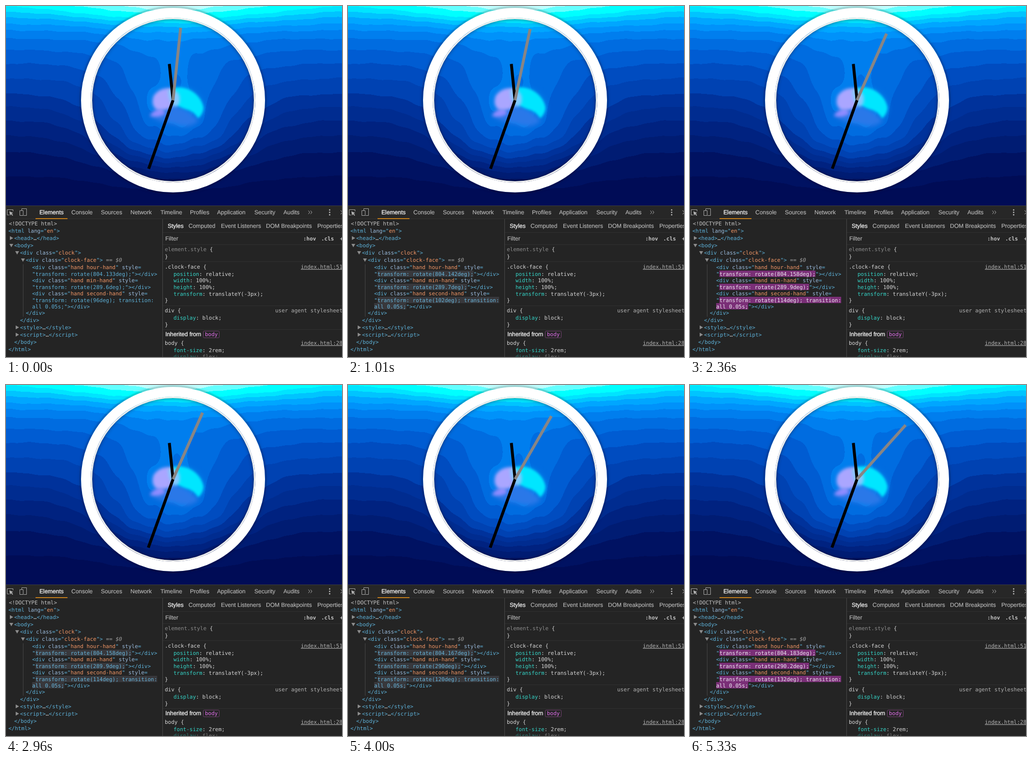
An HTML page with a canvas that plays this animation: 694x723 px, repeating every 5430 ms.

```html
<!DOCTYPE html>
<html lang="en">
<head>
<meta charset="utf-8">
<title>Clock and inspector</title>
<style>
html, body { margin: 0; width: 100%; height: 100%; overflow: hidden; background: #242424; }
canvas, svg, .clock { position: absolute; left: 0; top: 0; }
svg { overflow: hidden; }
.clock {
  left: 155px; top: 4px; width: 380px; height: 380px; box-sizing: border-box;
  border: 20px solid #fff; border-radius: 50%;
  box-shadow: 0 0 0 4px rgba(0,0,0,.1), inset 0 0 0 3px #efefef,
    inset 0 0 10px #000, 0 0 10px rgba(0,0,0,.2);
}
text { white-space: pre; text-rendering: geometricPrecision; }
.mono { font: 11px "DejaVu Sans Mono", monospace; }
.ui { font: 12px "Liberation Sans", sans-serif; }
</style>
</head>
<body>
<canvas id="sea" width="694" height="411"></canvas>
<div class="clock"></div>
<svg id="stage" width="694" height="723" viewBox="0 0 694 723"></svg>
<script>
const LOOP = 5430;
const CENTER = { x: 345, y: 194 };

// ---------- underwater backdrop ----------
// Each band: depth where it ends, colour.
const BANDS = [
  [-31, '#beffff'], [-19, '#64ffff'], [-3, '#00ffff'], [8, '#00e4ff'], [20, '#00c4ff'],
  [34, '#00a6ff'], [48, '#0092fa'], [66, '#007eee'], [90, '#006ce0'], [118, '#005cd2'],
  [148, '#004cc0'], [180, '#0042b2'], [207, '#00329b'], [235, '#002c90'],
  [265, '#002280'], [300, '#001c73'], [350, '#001262'], [Infinity, '#000c56']
];
const bell = v => Math.exp(-v * v);

// The lit water around the middle lifts lighter bands downwards.
function depth(x, y) {
  const dx = x - CENTER.x, dy = y - 260;
  const glow = bell(dx / 145) * bell(dy / (dy < 0 ? 130 : 90));
  const surface = 36 * bell(dx / 230) * bell(y / 42);
  const ripple = Math.sin(x / 13 + y / 29) + Math.sin(x / 31 - y / 17) + .6 * Math.sin(x / 6);
  return y - 180 * glow - surface + ripple * (.8 + 4 * glow);
}

function drawSea() {
  const c = document.getElementById('sea').getContext('2d');
  const bandAt = (x, y) => BANDS.findIndex(b => depth(x, y) < b[0]);
  for (let x = 0; x < 694; x++) {
    let start = 0, band = bandAt(x, 0);
    for (let y = 1; y <= 411; y++) {
      const next = y < 411 ? bandAt(x, y) : -1;
      if (next === band) continue;
      c.fillStyle = BANDS[band][1];
      c.fillRect(x, start, 1, y - start);
      start = y;
      band = next;
    }
  }
  const blob = (color, blur, path) => {
    c.filter = `blur(${blur}px)`;
    c.fillStyle = color;
    c.fill(new Path2D(path));
  };
  const dome = 'M345 169C375 162 404 183 408 210Q406 224 397 231Q388 216 370 212Q352 206 345 195Z';
  blob('#008cf0', 7, dome);
  blob('#2a78e8', 5, 'M298 226Q306 206 345 204Q380 214 398 236Q380 256 345 242Q315 240 298 226Z');
  blob('#00e6ff', 2.5, dome);
  blob('#8f8cff', 3, 'M297 226Q308 212 322 212L330 221Q315 232 297 226Z');
  blob('#aaa6ff', 3, 'M345 170Q318 166 305 185Q298 205 312 214Q332 216 345 207Z');
  blob('#86c8ff', 3, 'M334 173Q350 168 358 184Q362 203 350 208Q336 202 334 173Z');
  c.filter = 'none';
}

// ---------- drawing helpers ----------
const stage = document.getElementById('stage');
function add(tag, attrs, parent = stage) {
  const el = document.createElementNS('http://www.w3.org/2000/svg', tag);
  for (const key in attrs) el.setAttribute(key, attrs[key]);
  return parent.appendChild(el);
}
const rect = (x, y, width, height, fill) => add('rect', { x, y, width, height, fill });
const path = (d, stroke, fill = 'none') => add('path', { d, stroke, fill });

const TAG = '#5db0d7', ATTR = '#9bbbdc', VALUE = '#f29766', PALE = '#d6d6d6', DIM = '#8a8a8a', PROP = '#35d4c7';

// Parts alternate: colour, text. y is the middle of the line.
function mono(x, y, ...parts) {
  const text = add('text', { x, y: y + 4, class: 'mono' });
  const spans = [];
  for (let i = 0; i < parts.length; i += 2) {
    const span = add('tspan', { fill: parts[i] }, text);
    span.textContent = parts[i + 1];
    spans.push(span);
  }
  return spans;
}
function label(x, y, content, active) {
  const fill = active ? '#efefef' : '#b9b9b9';
  add('text', { x, y: y + 4, class: 'ui', fill, stroke: fill, 'stroke-width': active ? .35 : .15 })
    .textContent = content;
}
const attrParts = (name, value) => [ATTR, ` ${name}`, TAG, '="', VALUE, value, TAG, '"'];
function arrow(x, y, open) {
  path(open ? `M${x} ${y - 3}h8l-4 7z` : `M${x + 1} ${y - 4}v8l7 -4z`, 'none', '#8c8c8c');
}

// ---------- inspector ----------
function drawToolbar() {
  rect(0, 411, 694, 312, '#242424');
  rect(0, 411, 694, 28, '#272727');
  rect(0, 411, 694, 1, '#3c3c3c');
  rect(0, 438, 694, 1, '#333');
  rect(61, 437, 66, 2, '#c27d1c');
  path('M14.5 423v-3.5h-12v11h4', '#a8a8a8');
  path('M7 423l8 3.2l-3.4 1.3l3 3.2l-1.4 1.3l-3-3.2l-1.7 3z', 'none', '#b4b4b4');
  path('M32.5 421v-3.5h10v14h-6M28.5 421.5h7v10h-7z', '#a8a8a8');
  const tabs = { Elements: 69, Console: 135, Sources: 196, Network: 257, Timeline: 319,
    Profiles: 380, Application: 436, Security: 513, Audits: 573 };
  for (const name in tabs) label(tabs[name], 425, name, name === 'Elements');
  path('M624.5 421.5l3 3.5l-3 3.5M629 421.5l3 3.5l-3 3.5', '#b4b4b4');
  for (const y of [420, 425, 430]) add('circle', { cx: 668.5, cy: y, r: 1.5, fill: '#b4b4b4' });
  path('M691 421l8 8M691 429l8 -8', '#b4b4b4');
}

const styleValues = [];
const marks = [];
function handMarkup(y, name) {
  mono(54, y, TAG, '<div', ...attrParts('class', `hand ${name}-hand`), ATTR, ' style', TAG, '=');
  const mark = rect(60.6, y + 7, 0, 13, 'none');
  const value = mono(54, y + 13.5, TAG, '"', TAG, '', TAG, name === 'second' ? '' : '"></div>')[1];
  marks.push(mark);
  styleValues.push(value);
}

function drawTree() {
  rect(35, 532, 1, 108, '#474747');
  mono(6, 448, '#c4c4c4', '<!DOCTYPE html>');
  mono(5, 463, TAG, '<html', ...attrParts('lang', 'en'), TAG, '>');
  mono(17, 478, TAG, '<head>', PALE, '…', TAG, '</head>');
  mono(17, 493, TAG, '<body>');
  mono(29, 508, TAG, '<div', ...attrParts('class', 'clock'), TAG, '>');
  const node = mono(41, 523, TAG, '<div', ...attrParts('class', 'clock-face'), TAG, '>', '#a0a0a0', ' == $0');
  node[node.length - 1].setAttribute('font-style', 'italic');
  handMarkup(538, 'hour');
  handMarkup(565, 'min');
  handMarkup(592, 'second');
  marks.push(rect(54, 612, 66.2, 13, 'none'));
  styleValues.push(mono(54, 618.5, TAG, 'all 0.05s;', TAG, '"></div>')[0]);
  mono(41, 632, TAG, '</div>');
  mono(29, 647, TAG, '</div>');
  mono(29, 662, TAG, '<style>', PALE, '…', TAG, '</style>');
  mono(29, 677, TAG, '<script>', PALE, '…', TAG, '<\/script>');
  mono(17, 692, TAG, '</body>');
  mono(5, 707, TAG, '</html>');
  arrow(7, 478);
  arrow(7, 493, true);
  arrow(19, 508, true);
  arrow(31, 523, true);
  arrow(19, 662);
  arrow(19, 677);
}

function drawStyles() {
  rect(323, 439, 1, 284, '#484848');
  const tabs = { Styles: 334, Computed: 377, 'Event Listeners': 444, 'DOM Breakpoints': 537, Properties: 643 };
  for (const name in tabs) label(tabs[name], 453, name, name === 'Styles');
  for (const y of [466, 491, 526, 617, 666]) rect(324, y, 370, 1, '#303030');
  label(329, 479, 'Filter');
  for (const [x, word] of [[614, ':hov'], [651, '.cls'], [690, '+']])
    mono(x, 479, '#c4c4c4', word)[0].setAttribute('font-weight', 'bold');

  const open = (y, name, color = PALE) => mono(328, y, color, name, PALE, ' {');
  const close = y => mono(328, y, PALE, '}');
  const rule = (y, name, value) => mono(346, y, PROP, name, PALE, `: ${value};`);
  const origin = (y, line) => mono(609, y, '#b0b0b0', `index.html:${line}`)[0]
    .setAttribute('text-decoration', 'underline');

  open(501, 'element.style', DIM);
  close(516);
  open(537, '.clock-face');
  origin(537, 51);
  rule(551.5, 'position', 'relative');
  rule(565, 'width', '100%');
  rule(579, 'height', '100%');
  rule(593, 'transform', 'translateY(-3px)');
  close(606);
  open(627, 'div');
  mono(556, 627, '#b0b0b0', 'user agent stylesheet');
  rule(642, 'display', 'block');
  close(656);
  label(329, 676, 'Inherited from', true);
  add('rect', { x: 407.5, y: 669.5, width: 33, height: 14, rx: 2, fill: 'none', stroke: '#70406e' });
  mono(411, 676, '#e36eec', 'body');
  open(694, 'body');
  origin(694, 28);
  rule(709, 'font-size', '2rem');
  mono(346, 722, '#2a7771', 'display', '#777', ': flex;');
}

// ---------- motion ----------
// Each tick: time, first fade level, time when the highlight is nearly gone.
const TICKS = [
  [140, 0, 1010], [1160, 0, 2060], [2210, 0, 2960],
  [3260, 1, 4000], [4150, 0, 5030], [5180, 0, LOOP]
];
// Highlight background and text colour while fading.
const FADE = [
  ['#92338f', '#ffffff'], ['#7a2f77', '#ece6f0'], ['#61325f', '#c3d6e8'],
  ['#50344f', '#93c4e1'], ['#463544', '#76bade'], ['#38383c', '#66b4da']
];

function hand(length, fill) {
  return rect(CENTER.x - length, CENTER.y - 3, length, 6, fill);
}

drawSea();
drawToolbar();
drawTree();
drawStyles();
const hands = [hand(75, '#000'), hand(150, '#000'), hand(150, '#888584')];

let shown = '';
function render(time) {
  const count = TICKS.filter(tick => time >= tick[0]).length;
  let level = -1;
  if (count) {
    const [start, first, end] = TICKS[count - 1];
    level = time >= end ? 5 : Math.min(4, first + Math.floor((time - start + 20) / 150));
  }
  const key = `${count}/${level}`;
  if (key === shown) return;
  shown = key;

  const angles = [804.1333 + count / 120, 289.6 + count / 10, 96 + count * 6];
  angles.forEach((angle, i) => {
    const value = `transform: rotate(${+angle.toFixed(3)}deg);${i === 2 ? ' transition:' : ''}`;
    hands[i].setAttribute('transform', `rotate(${angle} ${CENTER.x} ${CENTER.y})`);
    styleValues[i].textContent = value;
    marks[i].setAttribute('width', value.length * 6.622);
  });
  const [back, ink] = FADE[level] || ['none', TAG];
  marks.forEach(mark => mark.setAttribute('fill', back));
  styleValues.forEach(value => value.setAttribute('fill', ink));
}

const began = performance.now();
function loop() {
  render((performance.now() - began) % LOOP);
  requestAnimationFrame(loop);
}
loop();
</script>
</body>
</html>
```
